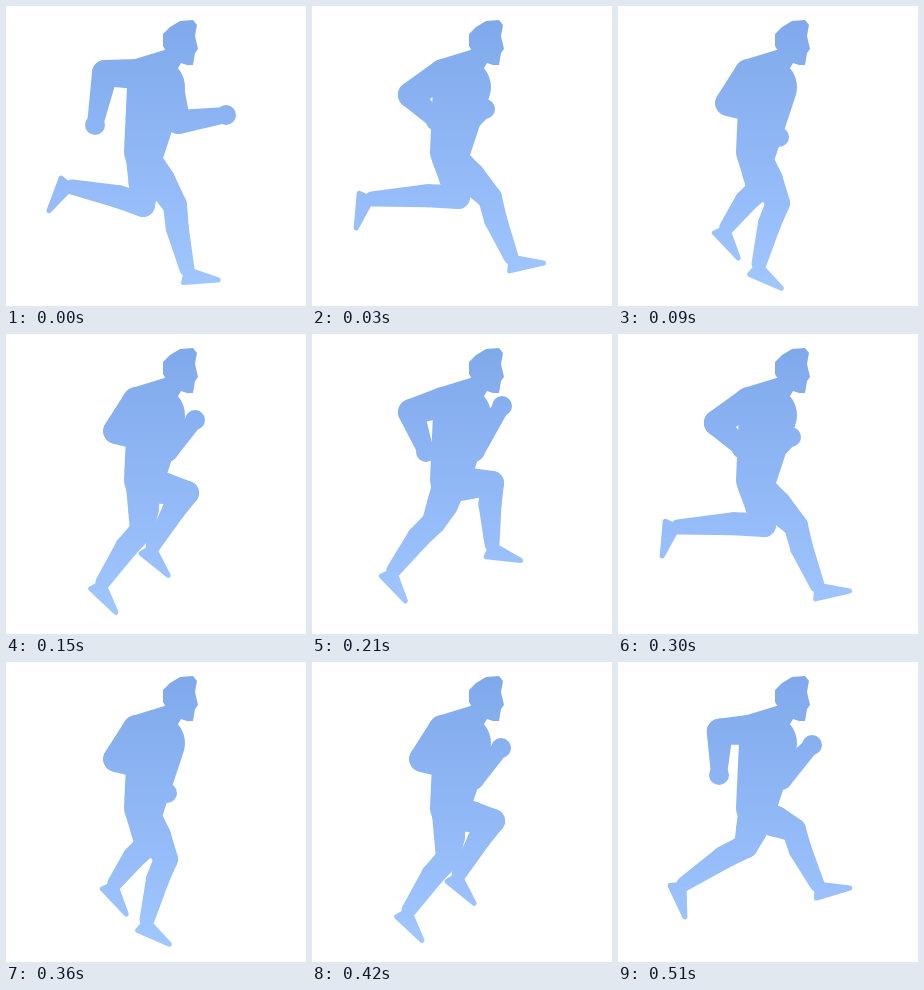
An HTML page with a canvas for the animation above (0.54 s loop, 300 by 300 pixels).

```html
<!DOCTYPE html>
<html>
<head>
<meta charset="utf-8">
<style>
html, body { margin: 0; width: 100%; height: 100%; overflow: hidden; background: #fff; }
canvas { display: block; }
</style>
</head>
<body>
<canvas id="stage" width="300" height="300"></canvas>
<script>
const ctx = document.getElementById('stage').getContext('2d');
const STEP = 30, STRIDE = 9, DEG = Math.PI / 180;

// Key points of one stride; both strides share the same outline.
// Elbows, calves and feet follow from these by rule.
const keys = [
  { at: 0, stance: [[169, 199], [181, 263]], swing: [[137, 199], [66, 181]], hands: [[89, 119], [220, 109]] },
  { at: 1, stance: [[178, 192], [199, 251]], swing: [[146, 191], [60, 193]], hands: [[124, 115], [173, 103]] },
  { at: 3, stance: [[160, 197], [141, 258]], swing: [[141, 183], [109, 221]], hands: [[130, 107], [161, 131]] },
  { at: 5, stance: [[136, 196], [97, 248]], swing: [[181, 159], [147, 212]], hands: [[130, 107], [189, 86]] },
  { at: 7, stance: [[122, 188], [82, 236]], swing: [[180, 149], [180, 210]], hands: [[114, 118], [190, 72]] },
  { at: 8, stance: [[128, 184], [66, 222]], swing: [[176, 168], [199, 222]], hands: [[101, 113], [194, 83]] }
];

const head = [[157, 40], [157, 28], [164, 21], [174, 15], [187, 14], [191, 19], [189, 30],
  [192, 43], [189, 47], [187, 59], [181, 59], [175, 57], [171, 64]];

const fill = ctx.createLinearGradient(0, 14, 0, 286);
fill.addColorStop(0, '#80a9ec');
fill.addColorStop(1, '#a1c7ff');
ctx.fillStyle = ctx.strokeStyle = fill;
ctx.lineJoin = 'round';
ctx.lineWidth = 5;

const mix = (a, b, k) => a.map((v, i) => v + (b[i] - v) * k);
const polar = ([x, y], angle, r) => [x + r * Math.cos(angle), y + r * Math.sin(angle)];
const heading = (a, b) => Math.atan2(b[1] - a[1], b[0] - a[0]);

function polygon(points) {
  ctx.beginPath();
  points.forEach(p => ctx.lineTo(...p));
  ctx.closePath();
  ctx.fill();
}

// Tapered capsule between two joints
function bone(a, ra, b, rb) {
  const dir = heading(a, b);
  const open = Math.acos((ra - rb) / Math.hypot(b[0] - a[0], b[1] - a[1]));
  ctx.beginPath();
  ctx.arc(...a, ra, dir + open, dir - open + 2 * Math.PI);
  ctx.arc(...b, rb, dir - open, dir + open);
  ctx.fill();
}

function disc(p, r) {
  ctx.beginPath();
  ctx.arc(...p, r, 0, 2 * Math.PI);
  ctx.fill();
}

function leg([knee, ankle]) {
  const hip = [137, 152], shin = heading(knee, ankle), foot = shin - 60 * DEG;
  const thigh = polar(mix(hip, knee, 0.5), heading(hip, knee) - 90 * DEG, 1);
  const calf = polar(mix(knee, ankle, 0.35), shin + 90 * DEG, 2);
  bone(hip, 17, thigh, 15.5);
  bone(thigh, 15.5, knee, 12);
  bone(knee, 12, calf, 11.5);
  bone(calf, 11.5, ankle, 7.5);
  polygon([ankle, polar(ankle, foot + 85 * DEG, 14), polar(ankle, foot, 33)]);
  ctx.stroke();
}

function arm(shoulder, shoulderSize, elbow, elbowSize, hand) {
  bone(shoulder, shoulderSize, elbow, elbowSize);
  bone(elbow, elbowSize, hand, 8);
  disc(hand, 10);
}

function arms([rear, front]) {
  const tuck = (rear[0] - 89) / 41;
  const rearElbow = [99 + 1.4 * Math.max(0, 115 - rear[1]), 67 + 30 * tuck ** 2];
  const frontElbow = [150 + 0.38 * (front[0] - 161), 116];
  arm([131, 68], 15, rearElbow, 13, rear);
  arm([165, 82], 13, frontElbow, 12, front);
}

function body() {
  bone([150, 81], 29, [138, 146], 20);
  bone([131, 68], 15, [166, 51], 9);
  polygon(head);
}

function poseAt(step) {
  const i = keys.findLastIndex(key => key.at <= step);
  const a = keys[i], b = keys[(i + 1) % keys.length];
  const k = (step - a.at) / ((b.at || STRIDE) - a.at);
  return part => a[part].map((p, j) => mix(p, b[part][j], k));
}

function draw(time) {
  const pose = poseAt(Math.floor(time / STEP) % STRIDE);
  ctx.clearRect(0, 0, 300, 300);
  leg(pose('swing'));
  leg(pose('stance'));
  body();
  arms(pose('hands'));
}

const start = performance.now();
function loop() {
  draw(performance.now() - start);
  requestAnimationFrame(loop);
}
loop();
</script>
</body>
</html>
```
